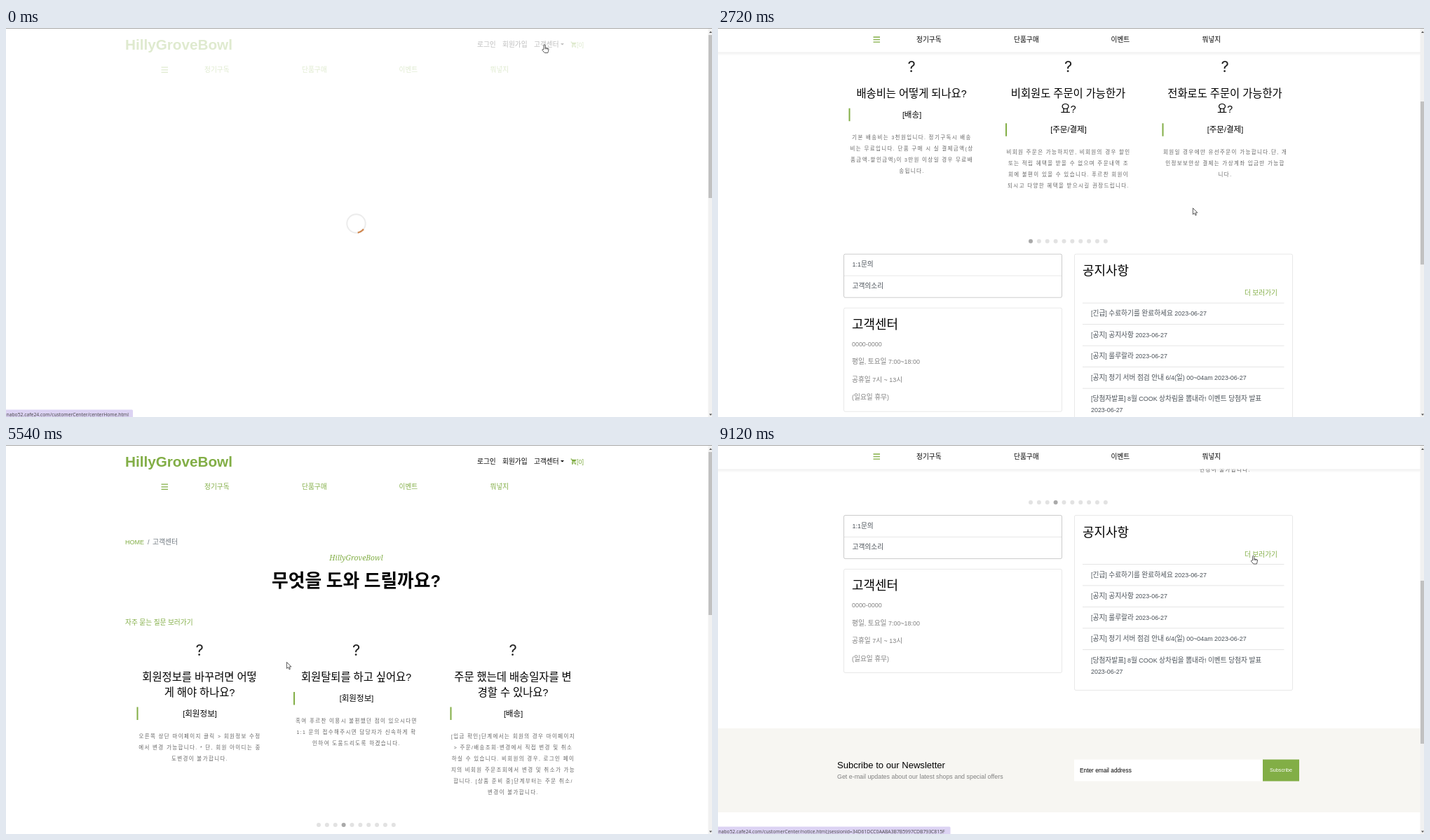
These frames come from a looping animation (1007x556 px, 9.7 s). An HTML page:

```html
<!DOCTYPE html>
<html lang="ko">
<head>
<meta charset="utf-8">
<title>고객센터</title>
<style>
html, body { margin: 0; width: 100%; height: 100%; overflow: hidden; background: #fff; }
svg { display: block; }
text { font-family: "Liberation Sans", Arial, sans-serif; white-space: pre; }
.k { font-family: "Noto Sans CJK KR", "Noto Sans CJK JP", sans-serif; font-size: 1.087em; }
.serif { font-family: "Noto Serif", "Liberation Serif", serif; font-style: italic; }
.mark { font-family: Inter, Roboto, sans-serif; }
.url { font-family: "Open Sans", "Noto Sans", sans-serif; }
</style>
</head>
<body>
<svg id="stage" width="1007" height="556" viewBox="0 0 1007 556"></svg>
<script>
const LOOP = 9700, DOWN = 461, GREEN = '#82ae46', GREY = '#808080', SLATE = '#495057';
const BRAND = 'HillyGroveBowl', HOST = 'nabo52.cafe24.com/customerCenter/';
const STEP = 223.5, BASE = 8.92;
const stage = document.getElementById('stage');

function el(tag, attrs, parent = stage) {
  const node = document.createElementNS('http://www.w3.org/2000/svg', tag);
  set(node, attrs);
  parent.appendChild(node);
  return node;
}
function set(node, attrs) {
  for (const name in attrs) node.setAttribute(name, attrs[name]);
}
const group = (parent, attrs = {}) => el('g', attrs, parent);
const rect = (parent, x, y, width, height, fill, more = {}) =>
  el('rect', { x, y, width, height, fill, ...more }, parent);
const path = (parent, d, attrs) => el('path', { d, ...attrs }, parent);

// Hangul runs get their own face, sized to a full-em advance.
function text(parent, x, y, size, str, fill = '#000', more = {}) {
  const node = el('text', { x, y, 'font-size': size, fill, ...more }, parent);
  for (const run of str.match(/[가-힣]+|[^가-힣]+/g)) {
    const part = el('tspan', /[가-힣]/.test(run) ? { class: 'k' } : {}, node);
    part.textContent = run;
  }
  return node;
}
const middle = { 'text-anchor': 'middle' };

const linear = p => p;
const smooth = p => p * p * (3 - 2 * p);
const easeOut = p => 1 - (1 - p) ** 3;
function track(t, keys, ease = linear) {
  if (t <= keys[0][0]) return keys[0][1];
  for (let i = 1; i < keys.length; i++) {
    const [t0, a] = keys[i - 1], [t1, b] = keys[i];
    if (t < t1) return a + (b - a) * ease((t - t0) / (t1 - t0));
  }
  return keys[keys.length - 1][1];
}

function menu(parent, y, fill) {
  path(parent, `M221.5 ${y - 3.5}h9.5m-9.5 3.6h9.5m-9.5 3.6h9.5`, { stroke: GREEN, 'stroke-width': 1.3 });
  [[283, '정기구독'], [422, '단품구매'], [560.5, '이벤트'], [690.5, '뭐넣지']]
    .forEach(([x, label]) => text(parent, x, y + 3.5, BASE, label, fill));
}

// Page
const page = group(stage);
text(page, 170, 31, 20.7, BRAND, GREEN, { 'font-weight': 700 });
text(page, 672, 27, BASE, '로그인');
text(page, 708, 27, BASE, '회원가입');
text(page, 753, 27, BASE, '고객센터');
path(page, 'M791 22h5l-2.5 2.6z', { fill: '#000' });
path(page, 'M805.5 19.5h1.6l.5 1.2h6l-1.6 3.4h-3.3l-.6 1h4.6v.8h-6l1-2.1-1.5-3.4h-.7z', { fill: GREEN });
for (const x of [808, 812]) el('circle', { cx: x, cy: 27, r: .9, fill: GREEN }, page);
text(page, 814, 27, BASE, '[0]', GREEN);
menu(page, 59.7, GREEN);

const intro = group(page);
text(intro, 170, 142, 9, 'HOME', GREEN);
text(intro, 202, 142, 9, '/', '#6c757d');
text(intro, 209, 142, 9, '고객센터', '#6c757d');
text(intro, 499.5, 165, 10.4, BRAND, GREEN, { ...middle, class: 'serif' });
text(intro, 499.5, 203, 23.7, '무엇을 도와 드릴까요?', '#000', { ...middle, 'font-weight': 700 });
text(intro, 170, 256.5, BASE, '자주 묻는 질문 보러가기', GREEN);

// Question carousel
const CARDS = [
  ['배송비는 어떻게 되나요?', '배송',
    '기본 배송비는 3천원입니다. 정기구독시 배송|비는 무료입니다. 단품 구매 시 실 결제금액(상|품금액-할인금액)이 3만원 이상일 경우 무료배|송됩니다.'],
  ['비회원도 주문이 가능한가|요?', '주문/결제',
    '비회원 주문은 가능하지만, 비회원의 경우 할인|또는 적립 혜택을 받을 수 없으며 주문내역 조|회에 불편이 있을 수 있습니다. 푸르찬 회원이|되시고 다양한 혜택을 받으시길 권장드립니다.'],
  ['전화로도 주문이 가능한가|요?', '주문/결제',
    '회원일 경우에만 유선주문이 가능합니다.단, 개|인정보보안상 결제는 가상계좌 입금만 가능합|니다.'],
  ['회원정보를 바꾸려면 어떻|게 해야 하나요?', '회원정보',
    '오른쪽 상단 마이페이지 클릭 > 회원정보 수정|에서 변경 가능합니다. * 단, 회원 아이디는 중|도변경이 불가합니다.'],
  ['회원탈퇴를 하고 싶어요?', '회원정보',
    '혹여 푸르찬 이용시 불편했던 점이 있으시다면|1:1 문의 접수해주시면 담당자가 신속하게 확|인하여 도움드리도록 하겠습니다.'],
  ['주문 했는데 배송일자를 변|경할 수 있나요?', '배송',
    '[입금 확인]단계에서는 회원의 경우 마이페이지|> 주문/배송조회·변경에서 직접 변경 및 취소|하실 수 있습니다. 비회원의 경우, 로그인 페이|지의 비회원 주문조회에서 변경 및 취소가 가능|합니다. [상품 준비 중]단계부터는 주문 취소/|변경이 불가합니다.']
];
const clip = el('clipPath', { id: 'window' });
rect(clip, 171, 270, 657, 260, '#000');
const faq = group(page);
const slides = group(group(faq, { 'clip-path': 'url(#window)' }));
const marks = [];
CARDS.forEach(([title, tag, body], i) => {
  const x = 276 + STEP * i;
  const lines = title.split('|');
  const y = 362 + 21.5 * (lines.length - 1);
  marks.push(text(slides, x, 301, 22, '?', '#222', { ...middle, class: 'mark' }));
  lines.forEach((line, n) => text(slides, x, 337.3 + 21.6 * n, 14.15, line, '#000', middle));
  rect(slides, x - 89.5, y - 9, 2, 18.5, GREEN);
  text(slides, x + .5, y + 4.2, 10.65, `[${tag}]`, '#000', middle);
  body.split('|').forEach((line, n) =>
    text(slides, x + .5, y + 35 + 16.05 * n, 6.9, line, '#666', { ...middle, 'letter-spacing': 1.38 }));
});
const dots = Array.from({ length: 10 }, (_, i) =>
  el('circle', { cx: 446 + 11.87 * i, cy: 543, r: 3 }, faq));

// Lower panels
const lower = group(page, { transform: `translate(0 ${DOWN})` });
const frame = (x, y, w, h, alpha) =>
  rect(lower, x, y, w, h, '#fff', { rx: 2, stroke: `rgba(0,0,0,${alpha})` });
frame(179.5, 100.5, 311, 62, .2);
rect(lower, 180, 131, 310, .7, '#ddd');
text(lower, 191.5, 118.5, BASE, '1:1문의', SLATE);
text(lower, 191.5, 149.2, BASE, '고객의소리', SLATE);
frame(179.5, 177.5, 311, 148, .09);
text(lower, 191, 207.3, 16.5, '고객센터');
['0000-0000', '평일, 토요일 7:00~18:00', '공휴일 7시 ~ 13시', '(일요일 휴무)']
  .forEach((line, i) => text(lower, 191, 232 + 25.5 * i, BASE, line, GREY));

frame(508.5, 100.5, 311, 250, .09);
text(lower, 520, 130.5, 16.5, '공지사항');
text(lower, 798, 159.7, BASE, '더 보러가기', GREEN, { 'text-anchor': 'end' });
const rowTop = i => 170 + 30.5 * i;
const rowEnd = i => i < 4 ? rowTop(i + 1) : 338.5;
const rows = ['[긴급] 수료하기를 완료하세요 2023-06-27', '[공지] 공지사항 2023-06-27', '[공지] 룰루랄라 2023-06-27',
  '[공지] 정기 서버 점검 안내 6/4(일) 00~04am 2023-06-27', '[당첨자발표] 8월 COOK 상차림을 뽐내라! 이벤트 당첨자 발표|2023-06-27']
  .map((label, i) => {
    const back = rect(lower, 520, rowTop(i), 287.5, rowEnd(i) - rowTop(i), '#fff');
    rect(lower, 520, rowTop(i), 287.5, .8, '#dfdfdf');
    label.split('|').forEach((line, n) =>
      text(lower, 532, rowTop(i) + 18.5 + 16 * n, BASE, line, SLATE));
    return back;
  });

rect(lower, 0, 405, 1002, 120, '#f7f6f2');
text(lower, 170, 461.5, 13.07, 'Subcribe to our Newsletter');
text(lower, 170, 477.3, 8.88, 'Get e-mail updates about our latest shops and special offers', GREY);
rect(lower, 508, 449.5, 269, 31, '#fff');
rect(lower, 777, 449.5, 52, 31, GREEN);
text(lower, 516, 468, 8.3, 'Enter email address');
text(lower, 803, 467.2, 7.2, 'Subscribe', '#fff', middle);

// Fixed menu bar
const bar = group(stage);
for (let i = 1; i < 6; i++) rect(bar, 0, 0, 1002, 34 + i, '#000', { opacity: .012 });
rect(bar, 0, 0, 1002, 34.5, '#fff');
menu(bar, 16.5, '#000');

// Preloader
const veil = rect(stage, 0, 0, 1002, 556, '#fff');
const loader = group(stage);
el('circle', { cx: 499.5, cy: 279.5, r: 13.2, fill: 'none', stroke: '#ececec', 'stroke-width': 2 }, loader);
const arc = path(loader, 'M501.8 292.5A13.2 13.2 0 0 0 510 287.5', { fill: 'none', stroke: '#d08850', 'stroke-width': 2.3 });

// Browser chrome
rect(stage, 1001.5, 0, 6, 556, '#f1f1f1');
const thumb = rect(stage, 1002, 10, 5, 233, '#c1c1c1');
path(stage, 'M1003 7l2-2.5 2 2.5zM1003 551.5l2 2.5 2-2.5z', { fill: '#555' });
rect(stage, 0, 0, 1007, 1, '#a6a6a6');
function statusBar(width, url) {
  const g = group(stage);
  rect(g, -2, 545.5, width + 2, 12, '#dcd3f3', { rx: 1.5 });
  text(g, .5, 554.7, 6.8, url, '#444', { class: 'url' });
  return g;
}
const status = {
  center: statusBar(181, HOST + 'centerHome.html'),
  more: statusBar(331.5, HOST + 'notice.html;jsessionid=34D61DCC0AABA3B7B5997CDB793C815F')
};

const cursor = group(stage, { fill: '#fff', stroke: '#333', 'stroke-width': .8, 'stroke-linejoin': 'round' });
const arrow = path(cursor, 'M.4.4V9.4L2.5 7.6 4 10.8 5.4 10.2 4 7H6.9z', {});
const hand = path(cursor, 'M-1 7V1.4a1.1 1.1 0 0 1 2.2 0V4.8l3.9.8q1 .3.9 1.5l-.6 3L4.8 12H.3L-3 8.2q-.4-1.3.8-1.2zM1.2 4.8v2M3 5.2v1.8M4.7 5.6v1.6', {});

// Motion
const SCROLL = [[1050, 0], [1990, DOWN], [2140, DOWN], [2240, 397], [2470, 397], [3050, 0],
  [5890, 0], [6030, 397], [7020, 397], [7550, DOWN]];
const BAR = [[1500, 0], [1680, 1], [2760, 1], [2920, 0], [6160, 0], [6340, 1]];
const SLIDE = [[3300, 0], [3600, 1], [3800, 1], [4160, 2], [4480, 2], [5540, 3]];
const MOUSE = [[60, 768, 23.5], [760, 677, 257], [3150, 677, 257], [3320, 650, 368], [3600, 527, 370],
  [3690, 527, 370], [3820, 610, 356], [4160, 480, 350], [4250, 480, 350], [4480, 590, 328],
  [4900, 400, 310], [7020, 400, 310], [7500, 614, 294], [8240, 614, 294], [9120, 763.5, 158]];
const mouseX = MOUSE.map(k => [k[0], k[1]]), mouseY = MOUSE.map(k => [k[0], k[2]]);

function hoverAt(x, y, scroll) {
  if (scroll < 20 && x > 750 && x < 798 && y > 15 && y < 33) return 'center';
  const py = y + scroll - DOWN;
  if (x > 750 && x < 800 && py > 150 && py < 164) return 'more';
  if (x < 520 || x > 807) return null;
  const i = rows.findIndex((_, n) => py >= rowTop(n) && py < rowEnd(n));
  return i < 0 ? null : i;
}
const show = (node, on) => set(node, { visibility: on ? 'visible' : 'hidden' });
function reveal(node, p) {
  set(node, { opacity: p, transform: `translate(0 ${20 * (1 - p)})` });
}

function draw(t) {
  const scroll = track(t, SCROLL, smooth);
  set(page, { transform: `translate(0 ${-scroll})` });
  set(thumb, { y: 10 + scroll * .399 });
  set(bar, { transform: `translate(0 ${-42 * (1 - track(t, BAR, smooth))})` });

  const fade = track(t, [[60, 1], [360, 0]]);
  set(veil, { opacity: .74 * fade });
  set(loader, { opacity: fade });
  set(arc, { transform: `rotate(${t * .36} 499.5 279.5)` });
  reveal(intro, track(t, [[160, 0], [640, 1]], easeOut));
  reveal(faq, track(t, [[240, 0], [760, 1]], easeOut));

  const slide = track(t, SLIDE, easeOut);
  set(slides, { transform: `translate(${-STEP * slide} 0)` });
  marks.forEach(mark => show(mark, t > 1110));
  dots.forEach((dot, i) => set(dot, { fill: i === Math.round(slide) ? '#a9a9a9' : '#e2e2e2' }));

  const x = track(t, mouseX, smooth), y = track(t, mouseY, smooth);
  const over = hoverAt(x, y, scroll);
  set(cursor, { transform: `translate(${x} ${y})` });
  show(hand, over !== null);
  show(arrow, over === null);
  rows.forEach((row, i) => set(row, { fill: over === i ? '#f7f8f9' : '#fff' }));
  for (const name in status) show(status[name], over === name);
}

const start = performance.now();
function tick() {
  draw((performance.now() - start) % LOOP);
  requestAnimationFrame(tick);
}
tick();
</script>
</body>
</html>
```
